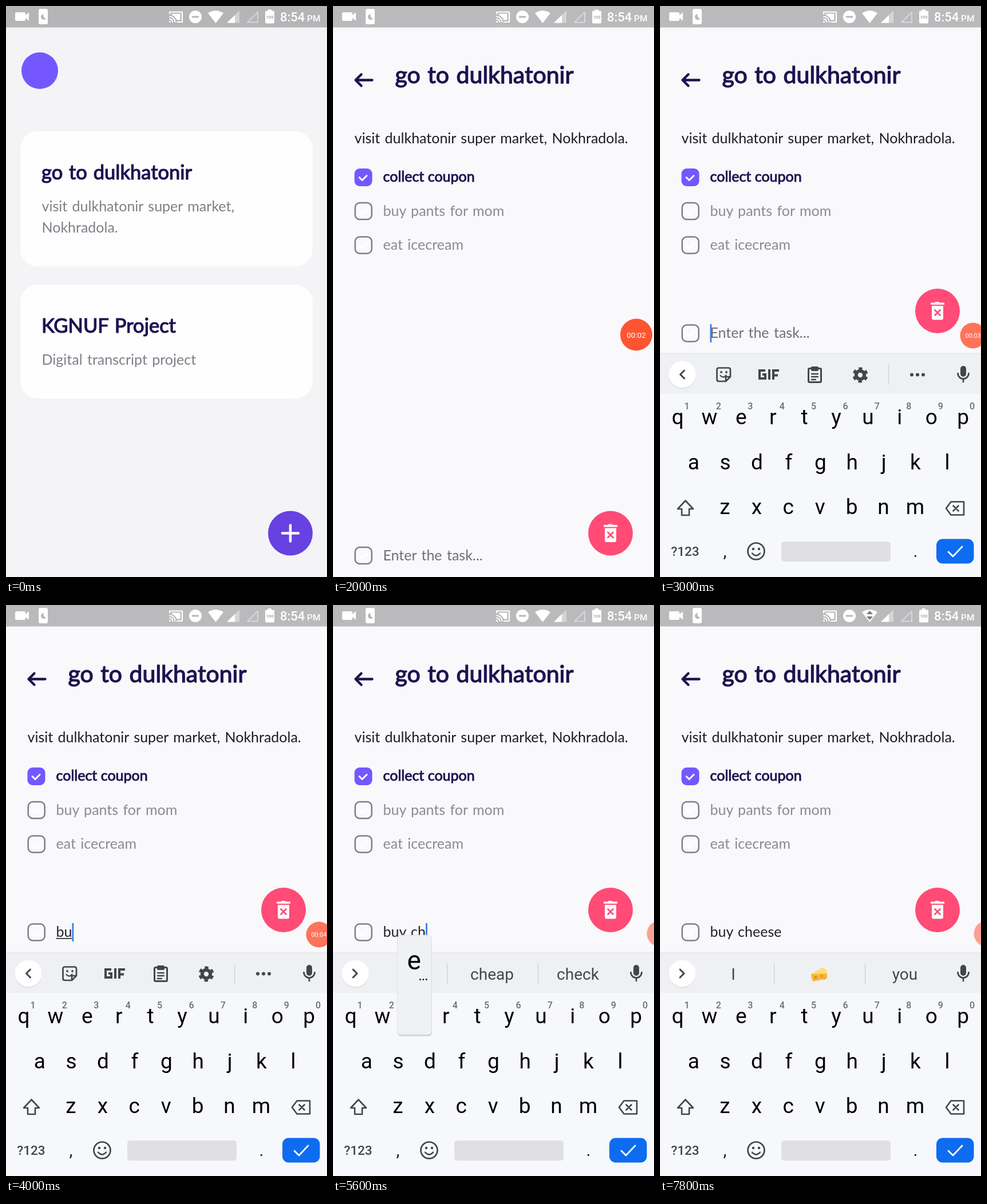
Recreate the animation shown at these times as an HTML page. Size 561x998 px, loop 8 s.

```html
<!DOCTYPE html>
<html lang="en">
<head>
<meta charset="utf-8">
<title>Task list</title>
<style>
  html, body { margin: 0; width: 100%; height: 100%; overflow: hidden; background: #f4f3f6; }
  svg { display: block; width: 100%; height: 100%; }
  text { white-space: pre; }
  .app { font: 25px Lato, "Open Sans", sans-serif; word-spacing: 2px; }
  .bold { fill: #1c1450; stroke: #1c1450; stroke-width: .9px; }
  .done { word-spacing: 0; }
  .title { font-size: 34.5px; stroke-width: 1.2px; }
  .head { font-size: 41px; stroke-width: 1.3px; }
  .key { font-family: Roboto, "Noto Sans", sans-serif; text-anchor: middle; }
  .line { fill: none; stroke-linecap: round; stroke-linejoin: round; }
</style>
</head>
<body>
<svg id="stage" viewBox="0 0 561 998" preserveAspectRatio="none"></svg>
<script>
const LOOP = 8000, STEP = 200;
const PLACE = 'dulkhatonir', AREA = 'Nokhradola';
const NAVY = '#1c1450', VIOLET = '#7457ff', PINK = '#ff4b76', ICON = '#444548';

const text = (x, y, s, attrs = '') => `<text x="${x}" y="${y}" ${attrs}>${s}</text>`;
const rect = (x, y, w, h, r, fill, attrs = '') =>
  `<rect x="${x}" y="${y}" width="${w}" height="${h}" rx="${r}" fill="${fill}" ${attrs}/>`;
const disc = (x, y, r, fill, attrs = '') => `<circle cx="${x}" cy="${y}" r="${r}" fill="${fill}" ${attrs}/>`;
const line = (d, color, width, attrs = '') =>
  `<path class="line" d="${d}" stroke="${color}" stroke-width="${width}" ${attrs}/>`;
const fill = (d, color, attrs = '') => `<path d="${d}" fill="${color}" ${attrs}/>`;
const key = (x, y, s, size, attrs = '') => text(x, y, s, `class="key" font-size="${size}" ${attrs}`);

function statusBar() {
  const w = '#fff';
  return `<rect id="bar" width="561" height="37.5"/>`
    + rect(16, 11, 18, 15, 2, w) + fill('M33 17l7-6v15l-7-6z', w)
    + rect(57, 5, 16, 27, 3, w)
    + fill('M66 14a5 5 0 1 0 4 8a5.500 5.500 0 0 1-4-8z', '#b8b7b9')
    + line('M286 13.500V10.500H308V28H299', w, 2.200)
    + fill('M289.500 13.500H304.500V24.500H298.500Q296 18 289.500 15.500z', w)
    + line('M286 18.500a9.500 9.500 0 0 1 9.500 9.500M286 22.700a5.300 5.300 0 0 1 5.300 5.300', w, 2)
    + disc(286.500, 27.500, 1.600, w)
    + disc(331, 19, 11, w) + rect(325, 17.500, 12, 3, 0, '#b8b7b9')
    + fill('M353 12.500Q366.500 3.500 380 12.500L366.500 30z', w)
    + `<g id="traffic">${fill('M366.500 10l5.500 6h-11zM366.500 26l5.500-6h-11z', '#777')}</g>`
    + fill('M386 29.500L408 8V29.500z', w, 'opacity=".4"') + fill('M386 29.500L400 15.800V29.500z', w)
    + line('M422 28.500L440 11V28.500z', w, 2, 'opacity=".45"')
    + rect(457.500, 6, 6.500, 4, 1, w) + rect(453, 8.500, 16, 22, 2, w)
    + key(461, 21.500, '100', 7.500, 'font-weight="700" fill="#aaa"')
    + text(479, 27, '8:54', 'font-family="Roboto, sans-serif" font-weight="500" font-size="22" fill="#fff"')
    + text(526, 27, 'PM', 'font-family="Roboto, sans-serif" font-weight="500" font-size="15.500" fill="#fff"');
}

function home() {
  const title = (y, s) => text(62, y, s, 'class="bold title"');
  const note = (y, s) => text(62.500, y, s, 'fill="#807f89"');
  return `<g id="home" class="app">`
    + rect(0, 0, 561, 998, 0, '#f4f3f6')
    + disc(59, 113, 32, VIOLET)
    + rect(25, 219, 511, 236.500, 31, '#fefefe') + rect(25, 487, 511, 199, 31, '#fefefe')
    + title(303, `go to ${PLACE}`)
    + note(359, `visit ${PLACE} super market,`) + note(396, `${AREA}.`)
    + title(571, 'KGNUF Project') + note(627, 'Digital transcript project')
    + disc(497, 921.500, 39, '#6741e2') + line('M483 921.500H511M497 907.500V935.500', '#fff', 4.500)
    + `</g>`;
}

function checkbox(y, on) {
  const tick = line(`M46 ${y}l5 5l8-8`, '#fff', 3);
  return (on ? rect(37.500, y - 15.500, 31, 31, 9, VIOLET)
    : rect(38.700, y - 14.500, 29, 29, 8, '#faf9fc', 'stroke="#7f7d8a" stroke-width="2.500"')) + tick;
}

function detail() {
  const task = (y, s) => checkbox(y, false) + text(87.500, y + 8, s, 'fill="#8b8b90"');
  const bin = line('M482 907H487', '#fff', 3) + rect(473, 907, 24, 3.500, 0, '#fff')
    + fill('M475 912.500H495V934q0 3-3 3H478q-3 0-3-3z', '#fff')
    + line('M480.500 920l9 9m0-9l-9 9', PINK, 2.800);
  return `<g id="detail" class="app">`
    + rect(0, 0, 561, 998, 0, '#f9f8fb')
    + line('M40 129.500H68.500M49.500 119.500L39.500 129.500L49.500 139.500', NAVY, 4.300)
    + text(108.500, 135, `go to ${PLACE}`, 'class="bold head"')
    + text(37.500, 240, `visit ${PLACE} super market, ${AREA}.`, 'fill="#1d1c22"')
    + checkbox(299.500, true) + text(87.500, 307, 'collect coupon', 'class="bold done"')
    + task(358.500, 'buy pants for mom') + task(418, 'eat icecream')
    + `<g id="entry">` + checkbox(960.500, false)
    + text(87.500, 968.500, '', 'id="typed"')
    + `<rect id="under" y="970.500" height="1.600" fill="#222"/>`
    + `<rect id="caret" y="944.500" width="2.800" height="32" fill="#3b80e8"/>`
    + disc(485, 921.500, 39, PINK) + bin
    + `</g></g>`;
}

const keyPos = {};
function letters(row, x0, y) {
  return [...row].map((c, i) => {
    const x = x0 + i * 55.4;
    keyPos[c] = [x, y];
    return key(x, y, c, 37, 'fill="#000"');
  }).join('');
}

function toolbar() {
  return `<g id="tools">`
    + line('M42.500 637l-7 7l7 7', ICON, 3)
    + line('M103 632.500H119.500q3.500 0 3.500 3.500V648l-8 8H103q-3.500 0-3.500-3.500V636q0-3.500 3.500-3.500zM123 648h-8v8', ICON, 2.700)
    + disc(107, 640, 1.900, ICON) + disc(116, 640, 1.900, ICON) + line('M105.500 646q5.500 5.500 10-.5', ICON, 2.300)
    + `<path d="M184 637H174V651H184V644H179M191 635V653M198 653V637H208M198 645.500H206" fill="none" stroke="${ICON}" stroke-width="4"/>`
    + rect(259.500, 633.500, 22, 24, 2, 'none', `stroke="${ICON}" stroke-width="3"`)
    + rect(264, 630, 13, 8, 2, ICON) + line('M265 643h11M265 648h11M265 653h7', ICON, 2.300)
    + `<g transform="rotate(15 350 645)">${disc(350, 645, 7.2, 'none', `stroke="${ICON}" stroke-width="6"`)}`
    + disc(350, 645, 11, 'none', `stroke="${ICON}" stroke-width="5" stroke-dasharray="6 5.520"`) + `</g>`
    + rect(399, 627, 1.200, 35, 0, '#ccced2')
    + [440, 450, 460].map(x => disc(x, 644.500, 3, ICON)).join('')
    + `</g>`;
}

function suggestions() {
  const cheese = fill('M264 645L284 634Q291 636 292 644V653L267 658Q264 651 264 645z', '#f6b73c')
    + fill('M264 645L284 634Q291 636 292 644z', '#ffdf70')
    + disc(272, 651, 2.800, '#dd922c') + disc(283, 648.500, 2.200, '#dd922c') + disc(287, 653, 1.500, '#dd922c');
  return `<g id="hints">`
    + rect(359, 610, 141, 68, 0, '#d8d9db', 'id="pressed"')
    + line('M35 637l7 7l-7 7', ICON, 3)
    + rect(199, 626, 1.200, 37, 0, '#ccced2') + rect(358, 626, 1.200, 37, 0, '#ccced2')
    + [128, 278, 428].map((x, i) => key(x, 655, '', 28, `id="hint${i}" fill="#46474a"`)).join('')
    + `<g id="cheese">${cheese}</g></g>`;
}

function keyboard() {
  const digits = [...'1234567890'].map((n, i) =>
    key(47 + i * 55.4, 705, n, 16, 'font-weight="500" fill="#6c6d71"')).join('');
  return `<g id="board">`
    + rect(0, 606.500, 561, 400, 0, '#e9eaed') + rect(0, 608.500, 561, 70, 0, '#eef0f3')
    + rect(0, 678, 561, 320, 0, '#f7f8fc')
    + disc(39, 645.500, 23.500, '#d9dbde') + disc(39, 644, 23.500, '#fff')
    + toolbar() + suggestions()
    + rect(525, 629, 10, 19, 5, ICON) + line('M520.500 642a9.500 9.500 0 0 0 19 0M530 652v5', ICON, 2.700)
    + letters('qwertyuiop', 31, 731) + digits
    + letters('asdfghjkl', 58.700, 809.500) + letters('zxcvbnm', 113.500, 888)
    + line('M44.500 864.500L31 879H38V890H51V879H58z', ICON, 2.600)
    + line('M508.500 866.500H531V889.500H508.500L500 878zM512.500 873.500l9 9m0-9l-9 9', ICON, 2.600)
    + key(44, 961, '?123', 22.500, `font-weight="500" fill="${ICON}"`)
    + key(113.500, 963, ',', 30, 'fill="#222"') + key(446.500, 963, '.', 30, 'fill="#222"')
    + disc(168, 953, 14.500, 'none', `stroke="${ICON}" stroke-width="2.700"`)
    + disc(163, 949, 2.200, ICON) + disc(173, 949, 2.200, ICON) + line('M161 956.500q7 8 14 0', ICON, 2.500)
    + rect(212, 936, 191, 35, 5, '#e0dfe3')
    + rect(483, 931.500, 65.500, 43, 11, '#0d6cf0') + line('M504 954l8 8l16-17', '#fff', 2.800)
    + `<g id="popup">` + rect(-29, -151.500, 60, 174, 6, '#aaa', 'opacity=".5"')
    + rect(-29.500, -154, 60, 174, 6, '#eff1f4', 'stroke="#dcdee1" stroke-width=".8"')
    + key(0, -94, '', 46, 'id="popKey" fill="#000"')
    + `<g id="more">${[10.500, 16, 21.500].map(x => disc(x, -76.500, 1.500, '#222')).join('')}</g></g>`
    + `</g>`;
}

const recorder = () => `<g id="rec">` + disc(0, 0, 28, '#ff5432')
  + key(0, 5, '', 13.500, 'id="clock" fill="#fff"') + `</g>`;

document.getElementById('stage').innerHTML =
  home() + detail() + statusBar() + keyboard() + recorder();

const el = {};
document.querySelectorAll('[id]').forEach(n => el[n.id] = n);

// time, field text, start of the underlined word (-1: none), suggestions
const typing = [
  [0, '', -1], [3400, 'b', 0], [3800, 'bu', 0],
  [4200, 'buy', 0, ['buy', 'but', 'bus']],
  [4600, 'buy ', -1, ['a', 'the', 'it']],
  [5000, 'buy c', 4, ['c', 'can', 'car']],
  [5400, 'buy ch', 4, ['ch', 'cheap', 'check']],
  [5800, 'buy che', 4, ['che', 'cheap', 'check']],
  [6000, 'buy chee', 4, ['chee', 'Chee', 'cheese']],
  [6800, 'buy cheese ', -1, ['I', '', 'you']]
];
const presses = [[0, ''], [3200, 'b'], [3400, ''], [3600, 'u'], [3800, ''], [5600, 'e'], [5800, '']];
// time, x, y, radius, opacity
const bubble = [[0, 530, 574.5, 28, 1], [2000, 530, 574.5, 28, 1], [2400, 541.5, 575.5, 24.2, .9],
  [3000, 547, 576, 22.5, .8], [4200, 547, 576, 22.5, .8],
  [4600, 571, 574.5, 22.5, .53], [LOOP, 571, 574.5, 22.5, .53]];

const at = (steps, t) => steps.filter(s => s[0] <= t).pop();
const show = (node, on) => { node.style.display = on ? '' : 'none'; };

function tween(keys, t) {
  const i = keys.findIndex(k => k[0] > t), a = keys[i - 1], b = keys[i];
  const p = (t - a[0]) / (b[0] - a[0]);
  return a.slice(1).map((v, n) => v + (b[n + 1] - v) * p);
}

function caretOn(t) {
  if (t < 2200) return false;
  if (t < 6400) return true;
  return (t >= 6800 && t < 7200) || (t >= 7600 && t < 7800);
}

function drawEntry(t) {
  const [, value, from, hints] = at(typing, t);
  el.entry.setAttribute('transform', `translate(0 ${t < 2600 ? 0 : -388.5})`);
  el.typed.textContent = value || 'Enter the task...';
  el.typed.setAttribute('fill', value ? '#222127' : '#717077');
  const width = n => n ? el.typed.getSubStringLength(0, n) : 0;
  const end = width(value.length);
  const start = from < 0 ? end : width(from);
  el.under.setAttribute('x', 87.5 + start);
  el.under.setAttribute('width', end - start);
  el.caret.setAttribute('x', 87.5 + end);
  show(el.caret, caretOn(t));

  show(el.tools, !hints);
  show(el.hints, !!hints);
  (hints || []).forEach((s, i) => { el['hint' + i].textContent = s; });
  el.hint1.setAttribute('font-weight', value === 'buy chee' ? 700 : 400);
  show(el.cheese, t >= 6800);
  show(el.pressed, t >= 6600 && t < 6800);
}

function drawBoard(t) {
  const p = Math.min(1, Math.max(0, (t - 2200) / 400));
  const rise = 1 - (1 - p) ** 2;
  el.board.setAttribute('transform', `translate(0 ${88 * (1 - rise)})`);
  el.board.setAttribute('opacity', rise ** .8);
  const letter = at(presses, t)[1];
  show(el.popup, letter);
  if (!letter) return;
  el.popup.setAttribute('transform', `translate(${keyPos[letter]})`);
  el.popKey.textContent = letter;
  show(el.more, letter === 'e');
}

function drawBubble(t) {
  const [x, y, r, alpha] = tween(bubble, t);
  el.rec.setAttribute('transform', `translate(${x} ${y}) scale(${r / 28})`);
  el.rec.setAttribute('opacity', alpha);
  el.clock.textContent = '00:0' + Math.floor(t / 1000);
  show(el.clock, t < 4600);
  show(el.rec, t >= 200);
}

function draw(t) {
  const open = t >= 1000;
  show(el.home, !open);
  show(el.detail, open);
  el.bar.setAttribute('fill', open ? '#bab9bb' : '#b5b4b6');
  show(el.traffic, t >= 7800);
  drawEntry(t);
  drawBoard(t);
  drawBubble(t);
}

const origin = performance.now();
function tick() {
  const t = (performance.now() - origin) % LOOP;
  draw(Math.floor(t / STEP) * STEP);
  requestAnimationFrame(tick);
}
tick();
</script>
</body>
</html>
```
